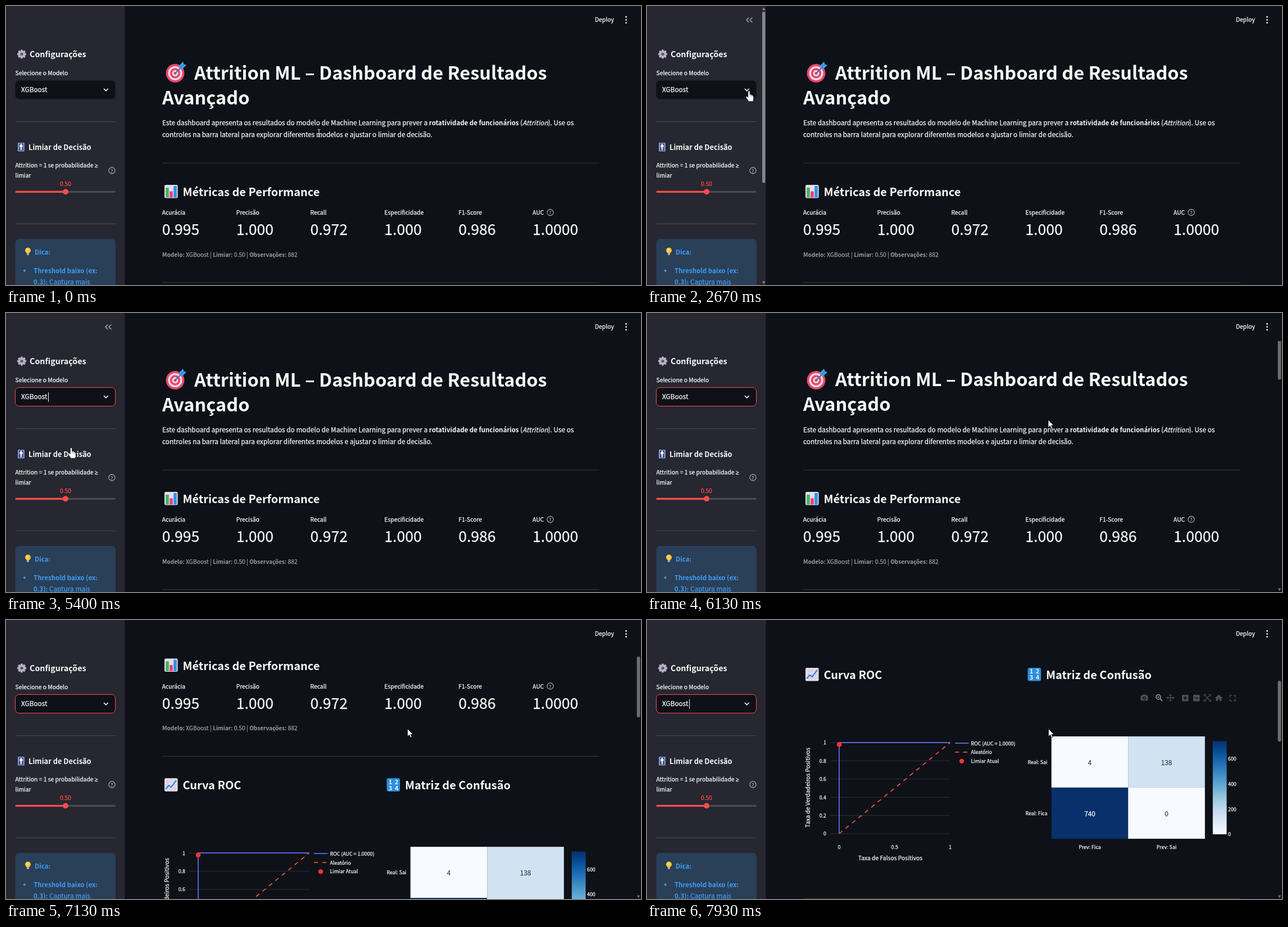
An HTML page that plays this animation: 1130 by 496 pixels, repeating every 8 s.

```html
<!DOCTYPE html>
<html lang="pt">
<head>
<meta charset="utf-8">
<title>Attrition ML</title>
<style>
html, body { margin: 0; width: 100%; height: 100%; overflow: hidden; background: #0e1117; }
svg { display: block; width: 1130px; height: 496px; }
text {
  font-family: "Noto Sans CJK JP", "Noto Sans CJK SC", "Noto Sans CJK", "Noto Sans", sans-serif;
  color: #fafafa; fill: currentColor; stroke: currentColor; stroke-width: .25px; white-space: pre;
}
.b { font-weight: 700; stroke: none; }
</style>
</head>
<body>
<svg id="stage" viewBox="0 0 1130 496" xmlns="http://www.w3.org/2000/svg"></svg>
<script>
const LOOP = 8000, FRAME = 1000 / 15;
const TICK = 82.5, TICK_TIME = 230;
const TICK_STARTS = [6130, 6260, 6670, 7108, 7350, 7830];
const OPEN = 3195, PICK = 5395;
const RED = '#ff4b4b', INK = '#fafafa';

// The CJK face draws Latin letters larger per em than the interface face.
const EM = 0.8955;
const BODY = 13.2, SMALL = 11.55, TINY = 9.9;

const text = (x, y, str, size = BODY, attrs = '') =>
  `<text x="${x}" y="${y}" font-size="${(size * EM).toFixed(2)}" ${attrs}>${str}</text>`;
const tint = color => `style="color:${color}"`;
const strong = s => `<tspan class="b" font-size="97%">${s}</tspan>`;
const rect = (x, y, w, h, fill, attrs = '') =>
  `<rect x="${x}" y="${y}" width="${w}" height="${h}" fill="${fill}" ${attrs}/>`;
const circle = (x, y, r, fill, attrs = '') => `<circle cx="${x}" cy="${y}" r="${r}" fill="${fill}" ${attrs}/>`;
const path = (d, stroke, width = 1, attrs = '') =>
  `<path d="${d}" stroke="${stroke}" stroke-width="${width}" fill="none" ${attrs}/>`;
const group = (x, y, body) => `<g transform="translate(${x} ${y})">${body}</g>`;
const list = (items, fn) => items.map(fn).join('');
const END = 'text-anchor="end"', MID = 'text-anchor="middle"';

const rule = (x, y, w, color) => rect(x, y, w, 0.9, color);
const help = (x, y) => circle(x, y, 5.6, 'none', 'stroke="#b6b7bb" stroke-width="1.100"') +
  text(x, y + 3, '?', 9, `${MID} ${tint('#b6b7bb')}`);
const heading = (x, y, str, size = 22.3) => text(x, y, str, size, 'class="b"');

// Pictograms
const gear = () => {
  const teeth = list([0, 45, 90, 135], a => rect(-1.9, -8, 3.8, 16, '#b9b3c9', `rx="1" transform="rotate(${a})"`));
  return group(28, 85.5, teeth + circle(0, 0, 4.6, 'none', 'stroke="#b9b3c9" stroke-width="3"') +
    circle(0, 0, 2.6, '#5b5669'));
};
const target = () =>
  circle(301, 119.5, 16.5, '#e8476b') + circle(301, 119.5, 12.6, '#f0dde8') +
  circle(301, 119.5, 9.2, '#e8476b') + circle(301, 119.5, 5.4, '#f0dde8') + circle(301, 119.5, 2.6, '#e8476b') +
  path('M301 119.5L313 108', '#3b6fb5', 2) +
  '<path d="M308 112L308.500 105.500 315 99 316.500 103.500 321 105 314.500 111.500Z" fill="#3f9fe6"/>' +
  path('M309 111.500L317 103.500', '#1f6fc0', 1);
const card = (x, y) => rect(x, y, 23.6, 23.6, '#e4dcec', 'rx="2.500"');
const bars = () => card(282, 318) +
  rect(284.2, 323, 5.6, 17.5, '#41b45e') + rect(291.2, 329.5, 5.6, 11, '#ee3f78') +
  rect(298.2, 320, 5.6, 20.5, '#2d92e6');
const trend = () => card(282, 85) + path('M288 86V108M294 86V108M300 86V108M283 91H305M283 97H305M283 103H305', '#cabfd8', 0.7) +
  path('M284 104L289.500 98 294 101 303 89', '#2a86dd', 2.2, 'stroke-linejoin="round"');
const numbers = () => rect(677.5, 85, 23.6, 23.6, '#2f8fe0', 'rx="3"') +
  list([['1', 684, 95.5], ['2', 695, 95.5], ['3', 684, 106.5], ['4', 695, 106.5]],
    ([n, x, y]) => text(x, y, n, 11.5, MID + ' class="b"'));
const fader = () => rect(21, 243, 11.8, 15.4, '#8b9bd0', 'rx="1.200"') +
  rect(23, 244.2, 7.8, 13, '#414d86', 'rx="1"') +
  rect(25.7, 245, 2.4, 11.4, '#e9e8f6') + rect(24.2, 247.2, 5.4, 3.6, '#fff', 'rx=".8"');
const bulb = () => circle(39, 434.5, 5, '#ffc83d') + '<path d="M36.400 438H41.600L41 440H37Z" fill="#ffc83d"/>' +
  rect(37, 439.6, 4, 3.4, '#a9a3b8', 'rx="1"') + circle(37.5, 433, 1.6, '#ffe48a');

const sidebar = () =>
  rect(0, 0, 211.5, 496, '#262730') + gear() +
  heading(42, 91, 'Configurações', 16) +
  text(16.5, 122.5, 'Selecione o Modelo', SMALL) +
  rect(16.5, 132.5, 178, 33, '#0e1117', 'id="select" rx="6.600"') +
  text(27, 153.3, 'XGBoost') + rect(75, 141, 1, 17, INK, 'id="caret"') +
  path('M174 147L177.800 150.800 181.600 147', INK, 1.7) +
  rule(16.5, 205.2, 178.5, '#505159') + fader() +
  heading(40, 256, 'Limiar de Decisão', 14.35) +
  text(16.5, 287, 'Attrition = 1 se probabilidade', SMALL) +
  text(158, 287, '≥', SMALL, 'style="font-family:\'Noto Sans\',\'Open Sans\',sans-serif"') +
  text(16.5, 305, 'limiar', SMALL) + help(188.5, 292.5) +
  text(106, 320, '0.50', SMALL, `${MID} ${tint(RED)}`) +
  rect(16.5, 328.7, 178.5, 3.3, '#484a54', 'rx="1.600"') + rect(16.5, 328.7, 89.5, 3.3, RED, 'rx="1.600"') +
  circle(106, 330.3, 5, RED) +
  rule(16.5, 386.7, 178.5, '#505159') +
  rect(16.5, 414, 178.5, 100, '#2a3f58', 'rx="6.600"') + bulb() +
  list([[51, 441.5, strong('Dica:')], [49, 475, strong('Threshold baixo (ex:')],
    [49, 495, strong('0.3):') + ' Captura mais']],
    ([x, y, s]) => text(x, y, s, BODY, tint('#3d9df3'))) +
  circle(32.8, 470.5, 2, '#3d9df3') +
  path('M181.400 20.500L177 24.800 181.400 29.100M187.400 20.500L183 24.800 187.400 29.100', '#a3a4ab', 1.5, 'id="collapse"') +
  `<g id="sideBar">${rect(205, 10, 5.6, 304.5, '#85868b', 'rx="2.800"')}
   <path d="M205 7.500L207.800 2.500 210.600 7.500ZM205 489.500L207.800 494.500 210.600 489.500Z" fill="#85868b"/></g>`;

const menu = () => `<g id="menu">${rect(16.5, 166.5, 178.5, 99.2, '#15181e', 'rx="6"')}
  ${rect(16.5, 166.5, 178.5, 33, '#1b1e25', 'id="hover" rx="2"')}
  ${rect(16.5, 232.7, 178.5, 33, '#0c0e13', 'rx="5"')}
  ${list(['Regressão Logística', 'Random Forest', 'XGBoost'], (s, i) => text(30, 187.3 + i * 33.1, s))}</g>`;

const intro = () =>
  target() +
  heading(335, 130.5, 'Attrition ML – Dashboard de Resultados', 36.3) + heading(278, 174.5, 'Avançado', 36.3) +
  text(278, 212.3, `Este dashboard apresenta os resultados do modelo de Machine Learning para prever a ${strong('rotatividade de funcionários')} (<tspan font-style="italic">Attrition</tspan>). Use os`) +
  text(278, 233, 'controles na barra lateral para explorar diferentes modelos e ajustar o limiar de decisão.') +
  rule(278, 278.8, 777.5, '#3d4045') + bars() + heading(314.5, 338, 'Métricas de Performance') +
  list([['Acurácia', '0.995'], ['Precisão', '1.000'], ['Recall', '0.972'], ['Especificidade', '1.000'],
    ['F1-Score', '0.986'], ['AUC', '1.0000']], ([name, value], i) => {
    const x = 277.8 + i * 131.85;
    return text(x, 371.3, name, SMALL) + text(x, 407.3, value, 29.7);
  }) + help(968.5, 367) +
  text(278, 445.6, `${strong('Modelo:')} XGBoost | ${strong('Limiar:')} 0.50 | ${strong('Observações:')} 882`, SMALL, tint('#9c9d9f')) +
  rule(278, 491.3, 777.5, '#3d4045');

const rocChart = () => {
  const left = 342, right = 539.5, top = 218, bottom = 380;
  const yAt = v => bottom - v * (bottom - top);
  return list([0, 0.2, 0.4, 0.6, 0.8, 1], v =>
    rule(326, yAt(v) - 0.4, right - 326, '#30343b') + text(319, yAt(v) + 3.5, v, TINY, END)) +
    list([0, 0.5, 1], v => text(left + v * (right - left), 407, v, TINY, MID)) +
    text(433, 427, 'Taxa de Falsos Positivos', SMALL, MID) +
    text(0, 0, 'Taxa de Verdadeiros Positivos', SMALL, MID + ' transform="translate(290 298) rotate(-90)"') +
    path(`M${left} ${bottom}V${top}H${right}`, '#636efa', 1.7) +
    path(`M${left} ${bottom}L${right} ${top}`, '#ef553b', 1.7, 'stroke-dasharray="7.400"') +
    circle(left, 221.5, 4.3, '#ff3333') +
    path('M548 219H572.500', '#636efa', 1.7) + path('M548 235H572.500', '#ef553b', 1.7, 'stroke-dasharray="7.400"') +
    circle(560, 251, 4.2, '#ff3333') +
    list(['ROC (AUC = 1.0000)', 'Aleatório', 'Limiar Atual'], (s, i) => text(576.5, 222.7 + i * 15.8, s, TINY));
};

const matrix = () => {
  const cells = [[4, '#f7fbff'], [138, '#d1e2f3'], [740, '#08306b'], [0, '#f7fbff']];
  const blues = ['#f7fbff', '#deebf7', '#c6dbef', '#9ecae1', '#6baed6', '#4292c6', '#2171b5', '#08519c', '#08306b'];
  return `<linearGradient id="blues" x1="0" x2="0" y1="1" y2="0">${list(blues, (c, i) => `<stop offset="${i / 8}" stop-color="${c}"/>`)}</linearGradient>` +
    list(cells, ([n, fill], i) => {
      const x = 719.7 + (i % 2) * 136.5, y = 207 + (i >> 1) * 91;
      return rect(x, y, 136.6, 91, fill) +
        text(x + 68.3, y + 51, n, BODY, `${MID} ${tint(n > 400 ? '#fff' : '#444')}`);
    }) +
    text(712.5, 256, 'Real: Sai', TINY, END) + text(712.5, 347, 'Real: Fica', TINY, END) +
    text(788, 407, 'Prev: Fica', TINY, MID) + text(924.5, 407, 'Prev: Sai', TINY, MID) +
    rect(1006.8, 215.3, 24.7, 165.7, 'url(#blues)') +
    list([0, 200, 400, 600], v => text(1034, 384.5 - v * 0.2235, v, TINY));
};

const toolbar = () => {
  const grey = '#4d5055';
  return `<g id="tools">
    ${rect(878.5, 134, 13, 9.4, grey, 'rx="1.500"')}${rect(882, 132.6, 6, 3, grey)}${circle(885, 138.8, 2.9, '#0e1117')}${circle(885, 138.8, 1.6, grey)}
    ${circle(910, 137, 4, 'none', 'stroke="#96989c" stroke-width="1.600"')}
    ${path('M913 140L917 144', '#96989c', 2)}${path('M908 137H912M910 135V139', '#96989c', 1)}
    ${path('M925.500 138.500H937.500M931.500 132.500V144.500M927.500 136.500L925.500 138.500 927.500 140.500M935.500 136.500L937.500 138.500 935.500 140.500M929.500 134.500L931.500 132.500 933.500 134.500M929.500 142.500L931.500 144.500 933.500 142.500', grey, 1.3)}
    ${rect(952, 133, 11.5, 11.5, grey, 'rx="1"')}${path('M954.500 138.700H961M957.750 135.500V142', '#0e1117', 1.8)}
    ${rect(972, 133, 11.5, 11.5, grey, 'rx="1"')}${path('M974.500 138.700H981', '#0e1117', 1.8)}
    ${path('M991.500 136V132.500H995M999.500 132.500H1003V136M1003 141V144.500H999.500M995 144.500H991.500V141M993 134L1001.500 143M1001.500 134L993 143', grey, 1.3)}
    <path d="M1010.500 139L1017.500 132.500 1024.500 139H1022.500V144H1019V140.500H1016V144H1012.500V139Z" fill="${grey}"/>
    ${path('M1037.500 137V134H1040.500M1044 134H1047V137M1047 140.500V143.500H1044M1040.500 143.500H1037.500V140.500', grey, 1.5)}</g>`;
};

const charts = () => group(0, 445.7,
  trend() + heading(314.5, 105, 'Curva ROC') + numbers() + heading(710, 105, 'Matriz de Confusão') +
  rocChart() + matrix() + toolbar() + rule(278, 495, 777.5, '#3d4045'));

const cursors = () => `<g id="hand"><path d="M-1.700 1.500Q-1.700 0 0 0T1.700 1.500V6.200Q4 5.600 4.400 7.200 6.400 6.800 6.800 8.400 8.300 8.400 8.300 10V13.500Q8.300 16 7 18.800H-.8Q-2 16-4.800 12.600-6.400 10.200-4.400 9.600-3.200 9.400-1.700 11.400Z" fill="#fff" stroke="#111" stroke-width=".8"/>
  ${path('M1.700 6.500V10M4.400 7.500V10.500M6.800 8.800V11', '#555', 0.6)}</g>
  <g id="arrow"><path d="M0 0V13.500L3.200 10.600 5.400 15.600 7.600 14.600 5.400 9.800H9.600Z" fill="#fff" stroke="#111" stroke-width=".8"/></g>
  <g id="beam">${path('M-2.500-6.500H-.6L0-6 .6-6.500H2.500M0-6V6M-2.500 6.500H-.6L0 6 .6 6.500H2.500', '#e8e8e8', 1)}</g>`;

const stage = document.getElementById('stage');
stage.innerHTML =
  '<clipPath id="view"><rect x="212" y="50" width="918" height="446"/></clipPath>' +
  rect(0, 0, 1130, 496, '#0e1117') +
  `<g clip-path="url(#view)"><g id="page">${intro()}${charts()}</g>
   <g id="mainBar">${rect(1122.6, 0, 5.8, 108, '#6d6f73', 'id="thumb" rx="2.900"')}
   <path d="M1122.700 489.500L1125.500 494.500 1128.300 489.500Z" fill="#6d6f73"/></g></g>` +
  text(1048, 28.4, 'Deploy', SMALL) + list([19.5, 24.7, 29.9], y => circle(1103.5, y, 1.4, INK)) +
  sidebar() + menu() + cursors();

const el = {};
stage.querySelectorAll('[id]').forEach(node => el[node.id] = node);
const show = (name, on) => el[name].setAttribute('visibility', on ? 'visible' : 'hidden');
const move = (name, x, y) => el[name].setAttribute('transform', `translate(${x.toFixed(2)} ${y.toFixed(2)})`);

// Pointer stops: time, x, y
const STOPS = [
  [0, 557, 226], [230, 557, 226], [400, 564, 229], [1000, 564, 229],
  [1533, 78, 146], [1800, 172, 150], [1867, 172, 150], [2267, 194, 155], [2667, 181.5, 151],
  [3200, 181.5, 151], [3933, 143, 212.5], [4000, 142, 214], [4400, 138, 252], [4867, 128, 178],
  [5200, 116, 239.5], [5400, 116, 239.5], [6133, 714, 190], [6900, 714, 190], [7100, 714.5, 193.5], [8000, 714.5, 193.5]
];
const clamp = v => Math.max(0, Math.min(1, v));
const smooth = p => p * p * (3 - 2 * p);
const quad = p => p < 0.5 ? 2 * p * p : 1 - 2 * (1 - p) ** 2;

function pointerAt(t) {
  const i = Math.max(1, STOPS.findIndex(s => s[0] >= t));
  const [t0, x0, y0] = STOPS[i - 1], [t1, x1, y1] = STOPS[i];
  const p = smooth(clamp((t - t0) / (t1 - t0)));
  return [x0 + (x1 - x0) * p, y0 + (y1 - y0) * p];
}
const scrollAt = t => TICK_STARTS.reduce((sum, s) => sum + TICK * quad(clamp((t - s) / TICK_TIME)), 0);
const caretAt = t => t >= OPEN &&
  (t < PICK ? t - OPEN : Math.max(0, t - 5470)) % 1060 < 530;

function render(ms) {
  const t = Math.floor(ms / FRAME + 0.1) * FRAME;
  const [x, y] = pointerAt(t), scroll = scrollAt(t);
  const inSide = x < 211.5, open = t >= OPEN && t < PICK;
  const onSelect = x > 16 && x < 195 && y > 132 && y < 166;
  const kind = open || onSelect || (t >= PICK && t < 5450) ? 'hand' : t < 1040 ? 'beam' : 'arrow';

  move('page', 0, -scroll);
  el.thumb.setAttribute('y', 10.4 + 0.219 * scroll);
  show('mainBar', t > 260 && !inSide);
  show('tools', scroll > 372);
  show('collapse', inSide);
  show('sideBar', inSide && (t < OPEN || t > 5450));
  el.select.setAttribute('stroke', t >= OPEN ? RED : 'none');
  show('caret', caretAt(t));
  el.menu.setAttribute('display', open ? 'inline' : 'none');
  const row = Math.floor((y - 166.5) / 33.1);
  show('hover', row >= 0 && row < 2);
  el.hover.setAttribute('y', 166.5 + row * 33.1);
  for (const name of ['hand', 'arrow', 'beam']) show(name, name === kind);
  move(kind, x, y);
}

const start = performance.now();
function loop() {
  render((performance.now() - start) % LOOP);
  requestAnimationFrame(loop);
}
loop();
</script>
</body>
</html>
```
